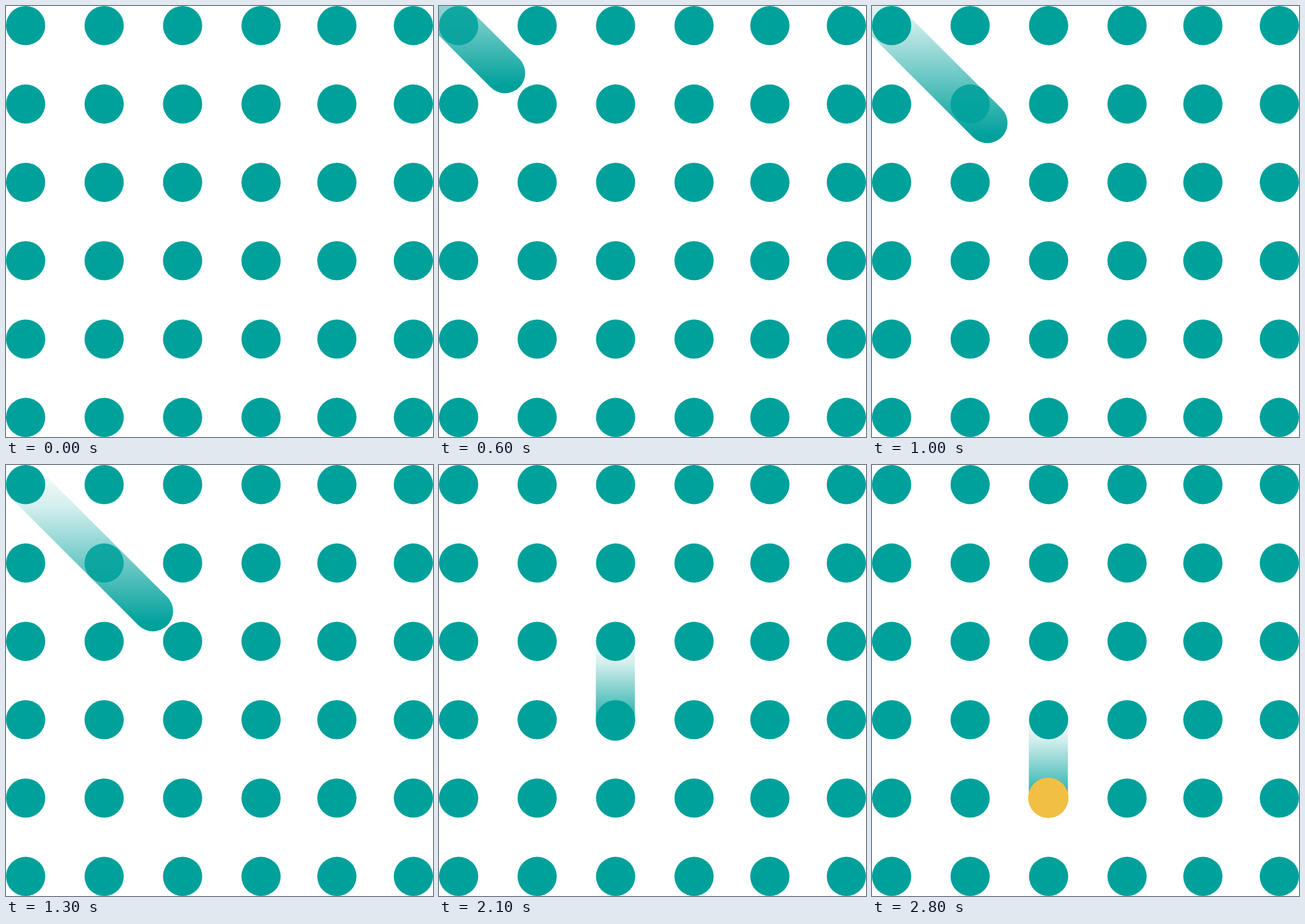
Write an HTML page that moves like this. It is 744x752 px and loops after 3.3 s.

```html
<!DOCTYPE html>
<html lang="en">
<head>
<meta charset="utf-8">
<title>Dot grid</title>
<style>
  html, body { margin: 0; width: 100%; height: 100%; overflow: hidden; background: #fff; }
  svg { display: block; width: 100%; height: 100%; }
  .trail { stroke: url(#fade); stroke-linecap: round; }
</style>
</head>
<body>
<svg viewBox="0 0 744 752">
  <defs>
    <linearGradient id="fade" gradientUnits="userSpaceOnUse" x1="0" x2="0">
      <stop offset="0" stop-color="#00a19b" stop-opacity="0"/>
      <stop offset=".27" stop-color="#00a19b" stop-opacity=".17"/>
      <stop offset="1" stop-color="#00a19b"/>
    </linearGradient>
    <clipPath id="dotClip"><circle id="clipDot" r="34.2"/></clipPath>
  </defs>
  <line class="trail" id="trail"/>
  <g id="dots" fill="#00a19b"></g>
  <g id="veil" clip-path="url(#dotClip)" opacity=".12">
    <line id="veilBase" stroke="#fff" stroke-linecap="round"/>
    <line class="trail" id="veilTrail"/>
  </g>
  <circle id="goal" r="35.2"/>
</svg>
<script>
const LOOP = 3300;
const cols = [34.2, 171, 307.7, 444.4, 576.5, 709.8];
const rows = [34.2, 171, 307.7, 444.4, 581.1, 717.8];
const $ = id => document.getElementById(id);

function set(el, attrs) {
  for (const key in attrs) el.setAttribute(key, attrs[key]);
}

for (const cy of rows) for (const cx of cols) {
  const dot = document.createElementNS('http://www.w3.org/2000/svg', 'circle');
  set(dot, { cx, cy, r: 34.2 });
  $('dots').append(dot);
}

// Head of the diagonal trail: start time, x, y
const slide = [
  [100, 65, 66], [300, 77, 79], [400, 90, 92], [500, 102, 104],
  [600, 115, 117], [700, 141, 143], [800, 167, 169.5], [900, 184, 187],
  [1000, 201, 204], [1100, 226, 228], [1300, 256, 255],
  [1500, 281, 281], [1600, 307.5, 306.5]
];
const DROP = 2100;

function show(el, on) {
  el.style.display = on ? '' : 'none';
}

function drawTrail(line, width, top, bottom) {
  for (const id of ['trail', 'veilBase', 'veilTrail'])
    set($(id), { ...line, 'stroke-width': width });
  set($('fade'), { y1: top, y2: bottom });
}

function drawGoal(color, cy) {
  set($('goal'), { cx: 307.2, cy, fill: color });
}

function render(t) {
  const moving = t >= 100;
  const diagonal = moving && t < DROP;
  show($('trail'), moving);
  show($('veil'), diagonal);
  show($('goal'), (t >= 1600 && t < DROP) || t >= 2800);
  if (!moving) return;

  if (diagonal) {
    const [, x, y] = slide.findLast(step => t >= step[0]);
    drawTrail({ x1: x - 400, y1: y - 400, x2: x, y2: y }, 70.4, y - 259, y + 22);
    const passed = t < 800 ? 0 : 1;
    set($('clipDot'), { cx: cols[passed], cy: rows[passed] });
    drawGoal('#ff6057', 307);
  } else {
    const step = Math.floor((t - DROP) / 100);
    const y = step < 7 ? 447 + 16 * step : 581;
    const x = 307.3;
    drawTrail({ x1: x, y1: y - 127, x2: x, y2: y }, 68, y - 147, y + 19);
    drawGoal('#f2bf45', 580.7);
  }
}

const start = performance.now();
function tick() {
  render((performance.now() - start) % LOOP);
  requestAnimationFrame(tick);
}
tick();
</script>
</body>
</html>
```
